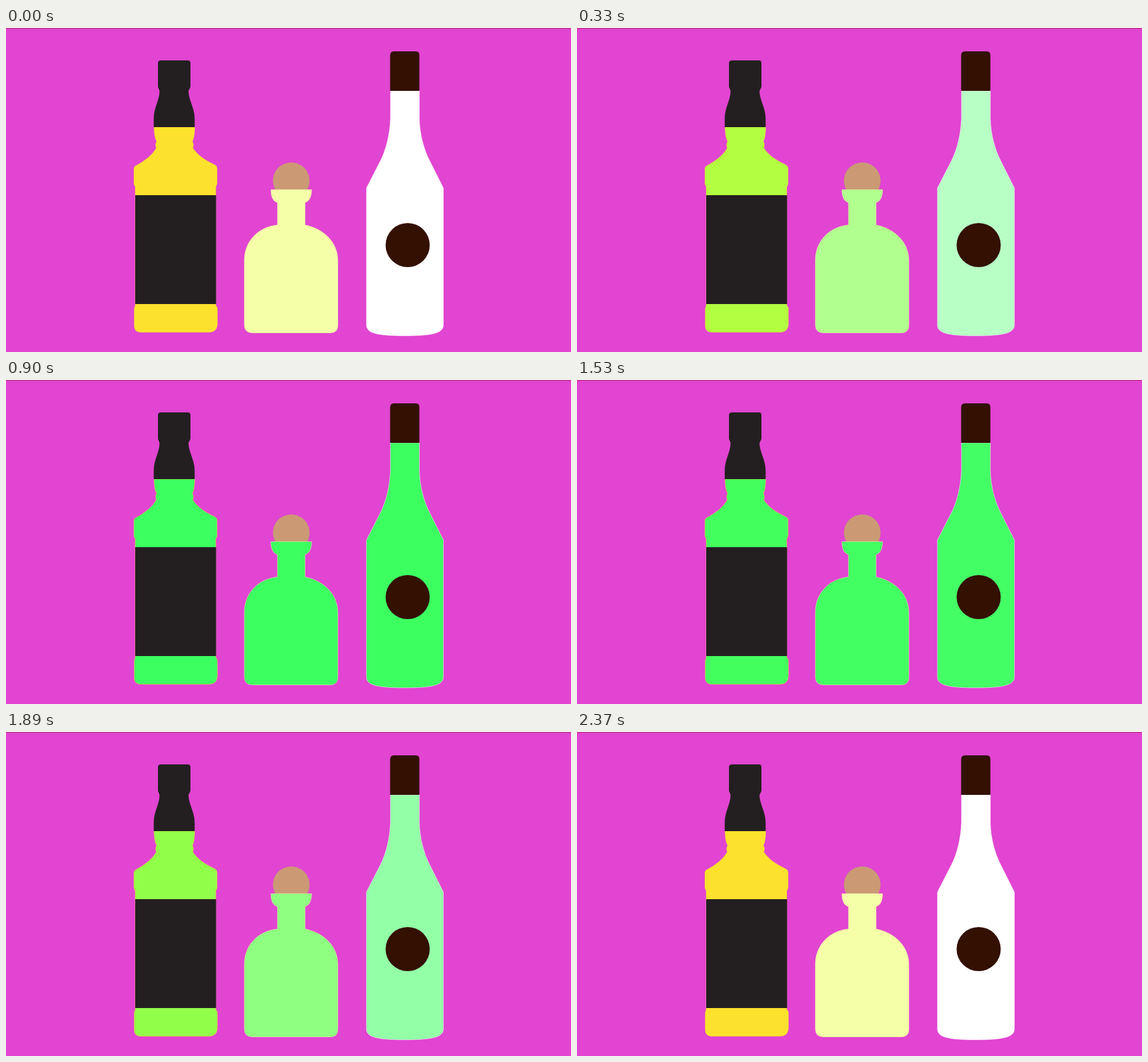
These frames come from a looping animation (870x500 px, 3 s). An HTML page:

```html
<!DOCTYPE html>
<html lang="en">
<head>
<meta charset="utf-8">
<title>Three bottles</title>
<style>
  html, body { margin: 0; width: 100%; height: 100%; overflow: hidden; background: #e145d1; }
  svg { display: block; width: 100%; height: 100%; }

  .glass {
    fill: var(--base);
    stroke: var(--base);
    stroke-opacity: .5;
    stroke-width: 1;
    animation: tint 3s infinite;
  }
  .amber { --base: #fce22c; animation-name: tint-amber; }
  .pale { --base: #f4ffa8; }
  .white { --base: #fff; }

  /* 30 ms per step: fade to green, hold, fade back, hold */
  @keyframes tint {
    0% { fill: var(--base); animation-timing-function: steps(30); }
    30% { fill: #3cff60; }
    50% { fill: #3cff60; animation-timing-function: steps(29); }
    79%, 100% { fill: var(--base); }
  }
  /* passes through lime on the way */
  @keyframes tint-amber {
    0% { fill: var(--base); animation-timing-function: steps(11); }
    11% { fill: #b2ff41; animation-timing-function: steps(19); }
    30% { fill: #3cff60; }
    50% { fill: #3cff60; animation-timing-function: steps(18); }
    68% { fill: #b2ff41; animation-timing-function: steps(11); }
    79%, 100% { fill: var(--base); }
  }
</style>
</head>
<body>
<svg viewBox="0 0 870 500" preserveAspectRatio="none">
  <rect width="870" height="500" fill="#e145d1"/>
  <rect width="870" height="1" fill="#b4226f"/>

  <g id="tall-square">
    <path class="glass amber" d="M228 153H290.500Q290.500 168 287 175Q290 180 287.500 185C296 198 309 205 322 211.500Q325 213 325 217V241L323 245V428L325.500 432V457Q325 469.500 312 469.500H208Q197.500 469.500 197.500 460V434Q197.500 431 199 429V245L197 241V217Q197 214 200 212.500C212 206 225 197 231.500 185Q229 180 232 175Q228 168 228 153Z"/>
    <rect x="199" y="258" width="124.500" height="168" fill="#231f20"/>
    <path fill="#231f20" d="M239 50H280Q284 50 284 54V91L281 97C281 111 290.500 123 290.500 140V153H227.500V140C227.500 123 236.500 111 236.500 97L234 91V54Q234 50 239 50Z"/>
  </g>

  <g id="round-stopper">
    <path fill="#cb9a75" d="M415 250A28.200 28.200 0 1 1 463.500 250Z"/>
    <path class="glass pale" d="M408 249.500H470.500C470.500 261 467 267 460.500 269.500V304C490 310 511 331 511 359V459Q511 470.500 499 470.500H380Q367 470.500 367 458V359C367 329 388 307 418 304V269.500C411 267 408 261 408 249.500Z"/>
  </g>

  <g id="long-neck">
    <path class="glass white" d="M592 97H636.500V140C637 165 644 188 652 204L673.500 247V458C673.500 470 660 475 614 475C568 475 555 470 555 458V247L577 204C585 188 591 165 592 140Z"/>
    <path fill="#331000" d="M597.500 36H631Q636.500 36 636.500 42V97H591.500V42Q591.500 36 597.500 36Z"/>
    <circle cx="618.500" cy="335" r="34" fill="#331000"/>
  </g>
</svg>
</body>
</html>
```
